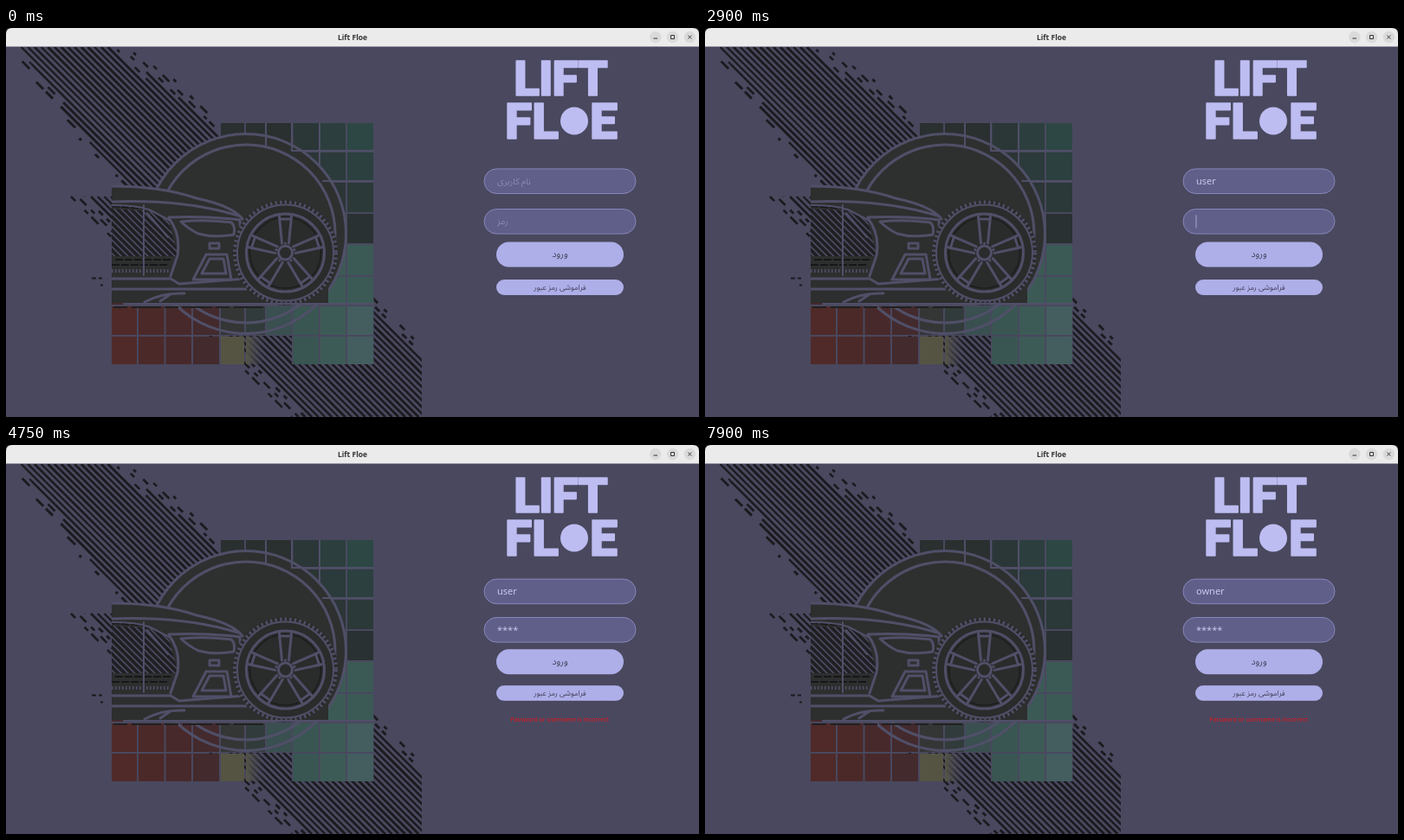
Write an HTML page that moves like this. It is 800x450 px and loops after 8000 ms.

```html
<!DOCTYPE html>
<html lang="en">
<head>
<meta charset="utf-8">
<title>Lift Floe</title>
<style>
  html, body { margin: 0; width: 100%; height: 100%; overflow: hidden; background: #111; }
  svg { display: block; width: 100vw; height: 100vh; }
  .latin { font-family: "Noto Sans", "Open Sans", sans-serif; }
  .farsi { font-family: "Noto Sans Arabic", "DejaVu Sans", sans-serif; }
  .logo { font: 900 55px Roboto, sans-serif; fill: #bdbdf2; stroke: #bdbdf2; stroke-width: 1.6; stroke-linejoin: round; }
  .mid { text-anchor: middle; }
  .line { fill: none; stroke: #504f68; stroke-width: 3; stroke-linecap: round; stroke-linejoin: round; }
  .thin { stroke-width: 2; }
</style>
</head>
<body>
<svg viewBox="0 0 800 450" xmlns="http://www.w3.org/2000/svg">
  <defs>
    <clipPath id="panel"><rect y="22" width="480" height="428"/></clipPath>
    <clipPath id="square"><rect x="122" y="110" width="302.500" height="279"/></clipPath>
    <clipPath id="upper"><rect x="122" y="110" width="302.500" height="209"/></clipPath>
    <clipPath id="hood"><path d="M122 209L160 211Q180 214 188 224L199 264H122Z"/></clipPath>
    <linearGradient id="fade"><stop stop-color="#555443"/><stop offset="1" stop-color="#49485e" stop-opacity="0"/></linearGradient>
  </defs>
  <path fill="#49485e" d="M0 10H800V450H0Z"/>
  <path fill="#ebebeb" d="M0 21.500V7Q0 0 7 0H793Q800 0 800 7V21.500Z"/>
  <text class="latin mid" x="400" y="13.500" font-size="8.500" font-weight="700" fill="#333">Lift Floe</text>
  <g fill="#dadada">
    <circle cx="749.800" cy="10.500" r="6.700"/><circle cx="769.600" cy="10.500" r="6.700"/><circle cx="789.400" cy="10.500" r="6.700"/>
  </g>
  <path fill="none" stroke="#333" d="M747.500 12H752M767.500 8.500h4v4h-4ZM787.400 8.500l4 4M791.400 8.500l-4 4"/>

  <g clip-path="url(#panel)">
    <g id="stripes" stroke="#1b1a1f" fill="none"></g>
    <path stroke="#1b1a1f" stroke-width="2" d="M99 289.500h5M107 289.500h4M109 297.500h3"/>
    <path fill="#49485e" d="M122 300H246V110H424.500V389H330V356H122Z"/>
    <g id="tiles"></g>
    <g clip-path="url(#upper)"><circle cx="277" cy="238" r="115" fill="#2d302f"/></g>
    <g clip-path="url(#square)">
      <g class="line">
        <circle cx="277" cy="238" r="115.500"/>
        <circle cx="277" cy="238" r="103"/>
        <path class="thin" d="M300 110V137M330 110V141M362 110V158M330 142H424M366 177H424"/>
      </g>
      <path fill="#2d2e2e" d="M122 182Q180 183 215 195Q262 207 272 220L277 302L372 290V318H122Z"/>
      <path fill="#49485e" clip-path="url(#hood)" d="M122 200H210V270H122Z"/>
      <g id="hatch" clip-path="url(#hood)" stroke="#1f1f22" stroke-width="3.600"></g>
      <path fill="none" stroke="#17171a" stroke-width="2" d="M122 206L165 209M126 268H190M122 274H188" stroke-dasharray="9 2"/>
      <path fill="none" stroke="#504f68" stroke-width="4" stroke-dasharray="1.500 2.500" d="M122 281H190"/>
      <g class="line">
        <path d="M122 183Q180 183 220 197Q262 206 273 221M122 201Q205 198 268 217"/>
        <path d="M188 219Q229 217 270 222L272 276Q272 286 280 292M188 220Q202 238 198 263L190 287"/>
        <path d="M202 224Q230 221 260 225Q265 229 263 239Q240 243 222 238Q210 232 202 224Z"/>
        <path d="M235 249H246V255H235ZM231 262H255L260 291H216L231 262M235 267H251L254 284H226Z"/>
        <path class="thin" d="M159 205V286M122 205Q150 205 165 210L188 222M163 214L187 242"/>
        <path d="M122 290H190L200 296L276 290M122 302H190L277 302M160 317Q180 306 206 307M178 316L190 308"/>
      </g>
    </g>
    <g id="wheel" transform="translate(322.500 260)"></g>
    <path class="line thin" d="M136 319H424"/>
    <path fill="none" stroke="#20201f" stroke-width="2" stroke-dasharray="16 5 34 4" d="M124 323H300"/>
  </g>

  <g class="logo">
    <text class="mid" x="640" y="78" letter-spacing="-1">LIFT</text>
    <g style="font-size:57px"><text x="576" y="128">FL</text><text x="674" y="128">E</text></g>
    <circle cx="656" cy="107.500" r="16" stroke="none"/>
  </g>
  <g id="form"></g>
</svg>
<script>
const NS = "http://www.w3.org/2000/svg";
const $ = id => document.getElementById(id);

function add(parent, tag, attrs, text) {
  const el = document.createElementNS(NS, tag);
  for (const k in attrs) el.setAttribute(k, attrs[k]);
  if (text) el.textContent = text;
  parent.appendChild(el);
  return el;
}

let seed = 11;
const rand = () => (seed = seed * 16807 % 2147483647) / 2147483647;

// 45 degree brush strokes; c is x - y along each one
const PITCH = 7.7;
function stripe(c, y0, y1, dashed) {
  const attrs = { d: `M${c + y0} ${y0}L${c + y1} ${y1}`, "stroke-width": 2.2 + rand() * 0.8 };
  if (dashed) {
    attrs["stroke-dasharray"] = [0, 0, 0, 0].map((_, i) => (i % 2 ? 4 + rand() * 26 : 3 + rand() * 10).toFixed(1)).join(" ");
    attrs["stroke-dashoffset"] = rand() * 30;
  }
  add($("stripes"), "path", attrs);
}
for (let c = -120; c < 140; c += PITCH) {
  const left = Math.max(0, -12 - c), right = Math.max(0, c - 103);
  const top = 22 + left * 4 + right * 2;
  const ragged = left || right ? 12 + rand() * 30 : 0;
  if (c > -48) {
    if (ragged) stripe(c, top - 25, top + ragged, true);
    stripe(c, top + ragged, 195, right > 22);
  }
  if (c < 118) stripe(c, right ? 300 : 195, 450, c < -102 || right);
}

// Mosaic tiles
const cols = [122, 153, 184.5, 216, 248, 277, 301, 331.5, 363, 394, 426];
const rows = [110, 144, 179, 215, 251, 288, 322, 357, 391];
function tile(c, r, fill) {
  add($("tiles"), "rect", { x: cols[c], y: rows[r], width: cols[c + 1] - cols[c] - 2, height: rows[r + 1] - rows[r] - 2, fill });
}
for (let r = 0; r < 6; r++)
  for (let c = r ? 6 : 4; c < 10; c++) {
    const green = Math.max(0, c - 6) * Math.max(0, 1 - r * 0.3);
    tile(c, r, r > 3 ? "#3b5a56" : `rgb(${42 + green},${47 + green * 8},${48 + green * 7})`);
  }
for (let r = 6; r < 8; r++) {
  for (let c = 0; c < 4; c++) tile(c, r, ["#4f2a29", "#4b2929", "#48292b", "#432a2d"][c]);
  for (let c = 7; c < 10; c++) tile(c, r, ["#395652", "#3d5b56", "#445d5f"][c - 7]);
}
tile(4, 6, "#343636");
tile(5, 6, "#313b3b");
tile(6, 6, "#394f50");
tile(4, 7, "#555443");
tile(5, 7, "url(#fade)");
add($("tiles"), "rect", { x: 122, y: 306, width: 61, height: 14, fill: "#452a2b" });

for (let c = -150; c < 0; c += PITCH) add($("hatch"), "path", { d: `M${c + 200} 200l70 70` });

// Wheel
const wheel = $("wheel");
const ring = (r, width, stroke, extra) => add(wheel, "circle", { r, fill: "none", stroke, "stroke-width": width, ...extra });
add(wheel, "circle", { r: 61, fill: "#2a2b2b" });
ring(58.5, 4, "#504f68", { "stroke-dasharray": "2.4 3.2" });
ring(55.5, 2, "#504f68");
ring(45, 3, "#504f68");
ring(41, 1.5, "#1c1c1e");
for (let i = 0; i < 5; i++) {
  const g = add(wheel, "g", { transform: `rotate(${i * 72})` });
  add(g, "path", { class: "line", d: "M-4 -11L-7 -42M4 -11L7 -42M-7 -39H7" });
  add(g, "circle", { cx: 0, cy: -11, r: 1.6, fill: "#504f68" });
}
add(wheel, "circle", { r: 8, class: "line", style: "fill:#2a2b2b" });

// Login form
const form = $("form");
function field(hint) {
  const g = add(form, "g", {});
  add(g, "rect", { x: 552, y: -14.3, width: 175, height: 28.6, rx: 14.3, fill: "#605f89", stroke: "#8786ba" });
  const mark = add(g, "rect", { x: 567, y: -8, height: 16, fill: "#e95420", opacity: 0.35 });
  const tip = add(g, "text", { class: "farsi", x: 567, y: 3.5, "font-size": 10.2, fill: "#8d8cbd" }, hint);
  const text = add(g, "text", { class: "latin", x: 567, y: 3.8, "font-size": 11, fill: "#c9c8ee" });
  const caret = add(g, "rect", { y: -7.5, width: 1, height: 15, fill: "#a3a2d2" });
  return (y, s) => {
    g.setAttribute("transform", `translate(0 ${y})`);
    text.textContent = s.text;
    const w = s.text ? text.getComputedTextLength() : 0;
    tip.style.display = s.hint ? "" : "none";
    mark.setAttribute("width", s.selected ? w : 0);
    caret.setAttribute("x", 566.5 + w);
    caret.style.display = s.caret ? "" : "none";
  };
}
function button(label, h, size) {
  const g = add(form, "g", {});
  add(g, "rect", { x: 566, y: -h / 2, width: 147, height: h, rx: Math.min(h / 2, 14.5), fill: "#aeaee8" });
  add(g, "text", { class: "farsi mid", x: 639.5, y: size * 0.32, "font-size": size, fill: "#41405c" }, label);
  return g;
}
const user = field("نام کاربری"), pass = field("رمز");
const enter = button("ورود", 29, 10.4), forgot = button("فراموشی رمز عبور", 18, 8.6);
const focus = add(forgot, "path", { d: "M574 -8.500H705M574 8.500H705", stroke: "#7776a8", "stroke-dasharray": "1 1", opacity: 0.6 });
const squeeze = add(form, "path", { d: "M566 219.300H713V222H566ZM566 251.300H713V256H566Z", fill: "#49485e" });
const error = add(form, "text", { class: "latin mid", x: 639, y: 320, "font-size": 7, "font-weight": 500, fill: "#e5141f" }, "Password or username is incorrect");

const LOOP = 8000;
const layouts = { start: [177.2, 223.8, 262, 300], tight: [167, 206.5, 240.7, 274.8], end: [169.4, 213.8, 250.8, 287] };
const count = (t, times) => times.filter(k => t >= k).length;
const within = (t, a, b) => t >= a && t < b;

function draw(t) {
  const layout = t < 3900 ? "start" : t < 3950 ? "tight" : "end";
  const [yu, yp, yb, yf] = layouts[layout];
  const first = "user".slice(0, count(t, [2200, 2300, 2400, 2500]));
  const second = "owner".slice(0, count(t, [5400, 5500, 5650, 5800, 5900]));
  const stars = t < 6400 ? count(t, [3250, 3350, 3500, 3600]) : count(t, [6400, 6550, 6700, 6850, 7000]);

  user(yu, {
    text: t < 5400 ? first : second,
    hint: t < 550,
    selected: within(t, 5000, 5400),
    caret: within(t, 550, 1150) || within(t, 1450, 2050) || within(t, 2200, 2900) || within(t, 4850, 5000) || within(t, 5400, 6000)
  });
  pass(yp, {
    text: "*".repeat(stars),
    hint: t < 2900,
    selected: within(t, 6000, 6400),
    caret: within(t, 2900, 3850) || within(t, 6400, 7900)
  });
  enter.setAttribute("transform", `translate(0 ${yb})`);
  forgot.setAttribute("transform", `translate(0 ${yf})`);
  squeeze.style.display = layout === "tight" ? "" : "none";
  focus.style.display = error.style.display = layout === "end" ? "" : "none";
}

const began = performance.now();
function tick() {
  draw((performance.now() - began) % LOOP);
  requestAnimationFrame(tick);
}
tick();
</script>
</body>
</html>
```
